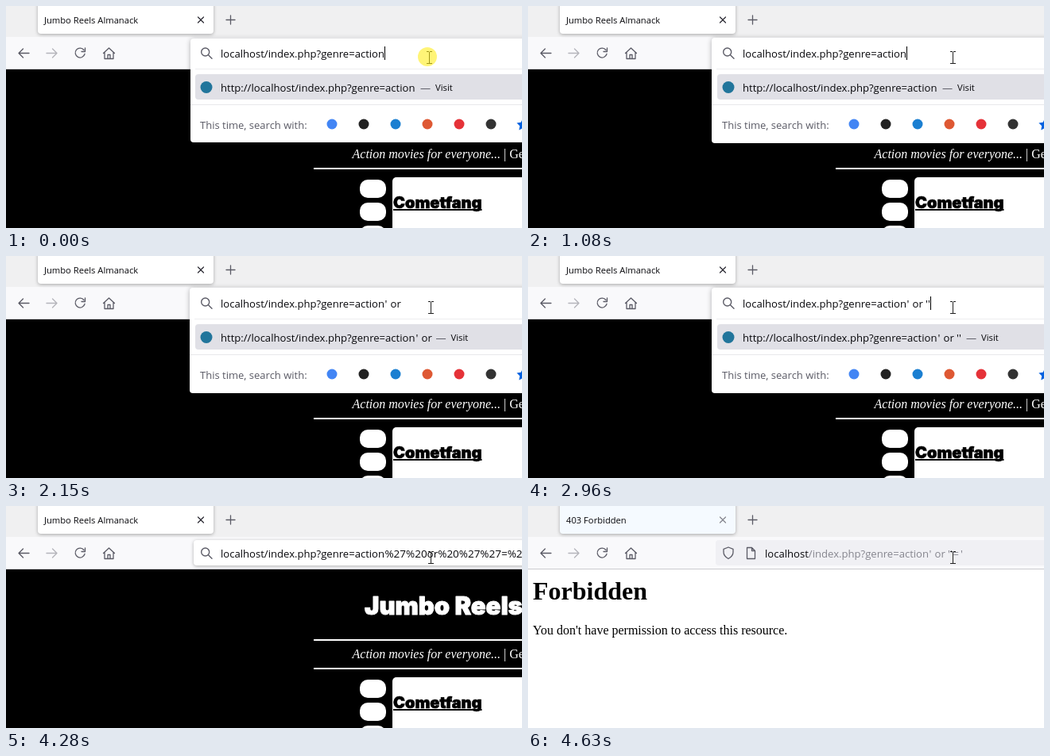
Animation, 649 px wide and 280 px high, one loop 4.81 s. Source, as an HTML page with a canvas:

```html
<!DOCTYPE html>
<html lang="en">
<head>
<meta charset="utf-8">
<title>Address bar</title>
<style>
html, body { margin: 0; width: 100%; height: 100%; overflow: hidden; }
canvas { display: block; }
</style>
</head>
<body>
<canvas id="stage" width="649" height="280"></canvas>
<script>
const ctx = document.getElementById('stage').getContext('2d');
const LOOP = 4810, SENT = 4280, LOADED = 4350, BLURRED = 4420;
const INK = '#08080c', ICON = '#5b5b66', DIM = '#85858e';
const UI = '"Open Sans", "Noto Sans", sans-serif';
const SERIF = '"Liberation Serif", serif';
const HEAVY = 'Inter, sans-serif';
const URL_FONT = `13.1px ${UI}`;

const ADDRESS = 'localhost/index.php?genre=action';
const TYPED = "' or ''='";
const KEY_TIMES = [1410, 1610, 1870, 2010, 2680, 2750, 2890, 3220, 3760];
// Caret offsets from the start of the address, one per typed character
const STOPS = [206.5, 210, 213.5, 221.5, 226, 230, 233, 236.5, 246, 249.5];

const clamp = v => Math.max(0, Math.min(1, v));
const keysAt = t => KEY_TIMES.filter(k => k <= t).length;

function rect(x, y, w, h, color, radius = 0) {
  ctx.fillStyle = color;
  ctx.beginPath();
  ctx.roundRect(x, y, w, h, radius);
  ctx.fill();
}

function raised(x, y, w, h, blur) {
  ctx.save();
  ctx.shadowColor = 'rgba(0,0,0,.3)';
  ctx.shadowBlur = blur;
  ctx.shadowOffsetY = 1;
  rect(x, y, w, h, '#fff', 4);
  ctx.restore();
}

function disc(x, y, r, color) {
  ctx.fillStyle = color;
  ctx.beginPath();
  ctx.arc(x, y, r, 0, 7);
  ctx.fill();
}

function text(str, x, y, font, color = INK) {
  ctx.font = font;
  ctx.fillStyle = color;
  ctx.fillText(str, x, y);
  return ctx.measureText(str).width;
}

function heavyText(str, x, y, size, color) {
  const width = text(str, x, y, `900 ${size}px ${HEAVY}`, color);
  ctx.strokeStyle = color;
  ctx.lineWidth = size / 30;
  ctx.strokeText(str, x, y);
  return width;
}

function icon(d, color = ICON, width = 1.3) {
  ctx.strokeStyle = color;
  ctx.lineWidth = width;
  ctx.lineCap = ctx.lineJoin = 'round';
  ctx.stroke(new Path2D(d));
}

function typed(x, y, count, color) {
  for (let i = 0; i < count; i++) text(TYPED[i], x + STOPS[i], y, URL_FONT, color);
}

function caret(x) {
  rect(Math.round(x), 51, 1, 17, '#000');
}

function moviePage() {
  rect(0, 80, 649, 200, '#000');
  heavyText('Jumbo Reels', 451, 137, 31, '#fff');
  rect(387, 168, 262, 2, '#fff');
  rect(387, 204, 262, 2, '#fff');
  const w = text('Action movies for everyone...', 435.5, 192, `italic 16px ${SERIF}`, '#fff');
  text(' | Genre', 435.5 + w, 192, `16px ${SERIF}`, '#fff');
  for (let y = 219; y < 280; y += 29) rect(445, y, 33, 23, '#fff', 10);
  rect(486, 216, 180, 80, '#fff', 5);
  const name = heavyText('Cometfang', 487, 255, 20, '#000');
  rect(487, 256, name, 2, '#000');
}

function errorPage() {
  rect(0, 80, 649, 200, '#fff');
  text('Forbidden', 6, 118, `bold 32px ${SERIF}`, '#000');
  text("You don't have permission to access this resource.", 6, 162, `16px ${SERIF}`, '#000');
}

function toolbar(t) {
  const loaded = t >= LOADED;
  rect(0, 0, 649, 39, '#f0f0f1');
  rect(0, 39, 649, 40, '#f9f9fb');
  rect(0, 79, 649, 1, '#ccccd0');
  raised(40, -6, 221, 41, 4);
  if (loaded) {
    const p = clamp((t - LOADED) / 280);
    ctx.save();
    ctx.beginPath();
    ctx.roundRect(40, -6, 221, 41, 4);
    ctx.clip();
    disc(56, 17.5, 18 + 600 * p, `rgba(10,132,255,${0.36 - 0.32 * p})`);
    ctx.restore();
  }
  text(loaded ? '403 Forbidden' : 'Jumbo Reels Almanack', 48, 22, `11.2px ${UI}`);
  icon('M241.5 14l7 7m0-7l-7 7', t >= BLURRED ? DIM : '#2b2a33', 1.2);
  icon('M277 17.5h11M282.5 12v11');
  icon('M29 59.5H16m5.5-5.5L16 59.5l5.5 5.5');
  icon('M51 59.5h13m-5.5-5.5L64 59.5l-5.5 5.5', '#b5b5bb');
  icon('M98 55.500a6 6 0 1 0 1 5M99.5 53v4.5H95');
  icon('M122.5 59.5l7-6.5 7 6.5M124 58.5v8h11v-8M128 66v-4.5h3V66');
}

function searchIcon() {
  icon('M255.7 58a5 5 0 1 1-10 0a5 5 0 1 1 10 0M254.5 61.7l4.5 4.5', ICON, 1.4);
}

function suggestions(t) {
  const open = clamp(Math.floor(t / 70) / 2);
  const left = 232 - open, top = 41 - open;
  raised(left, top, 440, 131 + 2 * open, 6);
  rect(left + 6, 79, 420, 1, '#ededf0');
  rect(left, 124, 440, 1, '#e8e8eb');
  rect(238, 86, 420, 32, '#e0e0e6', 4);

  const shown = TYPED.slice(0, keysAt(t - 70)).trimEnd().length;
  const end = 309 + STOPS[shown];
  disc(252, 102.5, 7.5, '#21759b');
  text('http://' + ADDRESS, 270, 108, URL_FONT);
  typed(309, 108, shown);
  text('—', end + 5.5, 108, URL_FONT, ICON);
  text('Visit', end + 24.5, 107, `11.3px ${UI}`);

  text('This time, search with:', 244, 155, `13px ${UI}`, ICON);
  ['#4285f4', '#222', '#1b7fd1', '#de5833', '#e53238', '#333']
    .forEach((color, i) => disc(410 + 40 * i, 149, 6.5, color));
  ctx.fillStyle = '#0060df';
  ctx.beginPath();
  for (let i = 0; i < 10; i++) {
    const a = i * Math.PI / 5 - Math.PI / 2, r = i % 2 ? 4 : 8;
    ctx.lineTo(650 + r * Math.cos(a), 150 + r * Math.sin(a));
  }
  ctx.fill();
}

function loadedBar(t) {
  const focused = t < BLURRED;
  const line = focused ? '#4a2d2d' : ICON;
  const color = focused ? INK : DIM;
  if (focused) raised(236, 43, 430, 32, 4);
  else rect(236, 43, 430, 32, '#f0f0f4', 4);
  icon('M252 52l6 2.3v4q0 5-6 8.2q-6-3.2-6-8.2v-4z', line);
  icon('M275.5 52.5h6l4 4v10h-10zM281.5 52.5v4h4', line);
  const host = text('localhost', 298, 65, URL_FONT);
  text(ADDRESS.slice(9), 298 + host, 65, URL_FONT, color);
  typed(298, 65, TYPED.length, color);
  if (focused) caret(298);
}

function typingBar(t) {
  const sent = t >= SENT;
  if (sent) raised(236, 43, 430, 32, 4);
  else suggestions(t);
  searchIcon();
  text(ADDRESS, 270, 65, URL_FONT);
  if (sent) {
    text('%27%20or%20%27%27=%27', 476.5, 65, `13.5px ${UI}`);
    return;
  }
  const count = keysAt(t);
  typed(270, 65, count);
  if (t < 540 || (t >= 1080 && t < 2150) || t >= 2680) caret(269.5 + STOPS[count]);
}

function pointer(t) {
  const p = clamp((t - 540) / 140);
  const x = 532 + Math.round(2 * p);
  rect(x, 58, 1, 15, '#222');
  for (const y of [57, 72]) {
    rect(x - 3, y, 3, 1, '#222');
    rect(x + 1, y, 3, 1, '#222');
  }
  // Click highlight, tinting the pointer too
  disc(530, 64, 12, `rgba(255,236,20,${0.58 * (1 - p)})`);
}

function frame() {
  const t = performance.now() % LOOP;
  if (t >= LOADED) errorPage();
  else moviePage();
  toolbar(t);
  if (t >= LOADED) loadedBar(t);
  else typingBar(t);
  pointer(t);
  requestAnimationFrame(frame);
}
frame();
</script>
</body>
</html>
```
